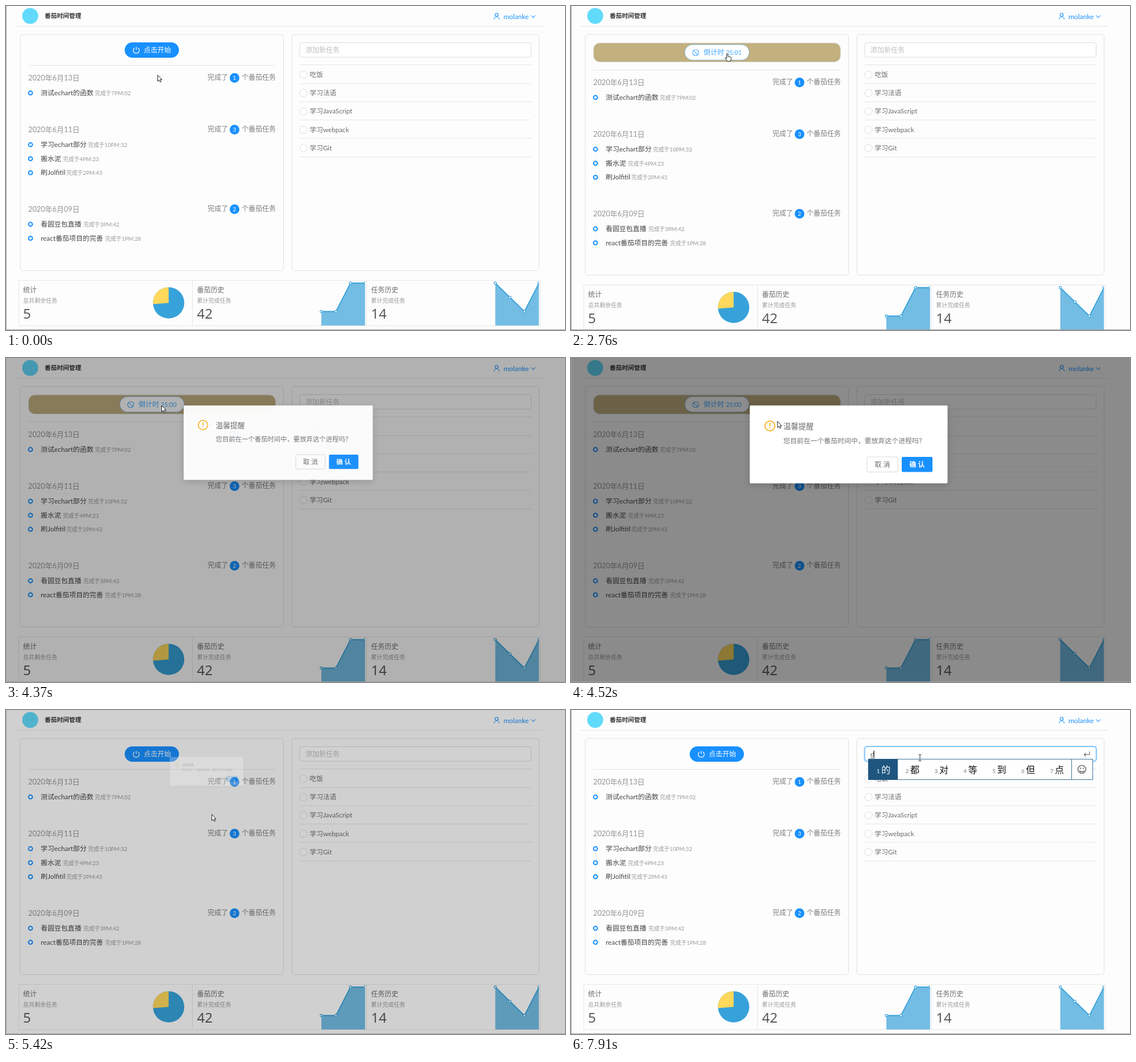
These frames come from a looping animation (982x570 px, 8 s). An HTML page:

```html
<!DOCTYPE html>
<html lang="zh-CN">
<head>
<meta charset="utf-8">
<title>番茄时间管理</title>
<style>
html, body { margin: 0; width: 100%; height: 100%; overflow: hidden; background: #fdfdfd; }
svg { display: block; font-family: Lato, "Noto Sans CJK SC", "Noto Sans CJK", sans-serif; }
</style>
</head>
<body>
<svg id="stage" width="982" height="570" viewBox="0 0 982 570"></svg>
<script>
const LOOP = 8000, BLUE = '#1890ff', HOVER = '#40a9ff', LINE = '#e6e6e6', CHART = '#37a2da';
const stage = document.getElementById('stage');

// The screen only refreshes at these moments and holds in between.
const poses = [0, 120, 250, 390, 520, 660, 790, 930,
  1570, 1700, 1830, 1960, 2090, 2220, 2350, 2760, 3690,
  4250, 4370, 4520, 4650, 4790, 4930, 5060,
  5300, 5420, 5570, 5720, 5870, 6020, 6170, 6320,
  6450, 6600, 6760, 6900, 7050, 7200, 7340, 7490, 7640, 7780, 7910];

const pointerPath = [[0, 266, 121], [930, 273, 83], [4370, 273, 83], [4930, 606, 187], [5060, 608, 188],
  [5300, 453, 188], [5420, 361, 183], [6320, 225, 293], [6450, 300, 267], [6600, 390, 241], [7490, 613, 84]];
const maskKeys = [[4120, 0], [4250, .1], [4370, .3], [4520, .45], [5300, .45], [5420, .18], [5570, .03], [5720, 0]];
const zoomKeys = [[4120, 0], [4250, .4], [4370, .956], [4520, 1], [5300, 1], [5420, .372], [5570, 0]];
const fadeKeys = [[4120, 0], [4250, .4], [4370, .96], [4520, 1], [5300, 1], [5420, .25], [5570, 0]];

// Linear interpolation between [time, ...values] keys.
function at(keys, t) {
  const i = keys.findIndex(k => k[0] > t);
  if (i === 0) return keys[0].slice(1);
  if (i < 0) return keys[keys.length - 1].slice(1);
  const a = keys[i - 1], b = keys[i], u = (t - a[0]) / (b[0] - a[0]);
  return a.slice(1).map((v, n) => v + (b[n + 1] - v) * u);
}

const text = (x, y, s, size = 12, fill = '#6c6c6c', more = '') =>
  `<text x="${x}" y="${y}" font-size="${size}" fill="${fill}" ${more}>${s}</text>`;
const rect = (x, y, w, h, fill = 'none', stroke = 'none', r = 0, more = '') =>
  `<rect x="${x}" y="${y}" width="${w}" height="${h}" rx="${r}" fill="${fill}" stroke="${stroke}" ${more}/>`;
const circle = (x, y, r, fill = 'none', stroke = 'none', w = 1) =>
  `<circle cx="${x}" cy="${y}" r="${r}" fill="${fill}" stroke="${stroke}" stroke-width="${w}"/>`;
const path = (d, stroke = 'none', w = 1, fill = 'none') =>
  `<path d="${d}" stroke="${stroke}" stroke-width="${w}" fill="${fill}"/>`;
const group = (x, y, body) => `<g transform="translate(${x} ${y})">${body}</g>`;
const MIDDLE = 'text-anchor="middle"';

const header = circle(42.5, 17.5, 14, '#61dafb')
  + text(68, 21, '番茄时间管理', 10.7, '#333', 'font-weight="700"')
  + circle(862, 15.5, 2.7, 'none', BLUE, 1.1) + path('M857.5 23.5a4.5 4.8 0 0 1 9 0', BLUE, 1.1)
  + text(874, 23, 'molanke', 12, BLUE) + path('M922.5 16.5l3.7 4 3.7-4', BLUE, 1.1)
  + path('M18 35.5H944', LINE);

const days = [
  [126, '2020年6月13日', [['测试echart的函数', 156, '7PM:02']]],
  [217, '2020年6月11日', [['学习echart部分', 144, '10PM:32'], ['搬水泥', 100, '4PM:23'], ['刷Jolfitil', 106, '2PM:43']]],
  [357, '2020年6月09日', [['看圆豆包直播', 136, '3PM:42'], ['react番茄项目的完善', 174, '1PM:28']]]
];

const history = path('M39 104.5H474', LINE) + days.map(([y, date, items]) =>
  text(39, y + 5, date, 12.8, '#949494')
  + text(354, y + 4, '完成了', 12, '#7c7c7c') + circle(401.5, y + .5, 8.5, BLUE)
  + text(401.5, y + 4, items.length, 10, '#fff', MIDDLE) + text(414, y + 4, '个番茄任务', 12, '#7c7c7c')
  + path(`M43 ${y + 27}v${(items.length - 1) * 24.7}`, '#f2f2f2', 1.5)
  + items.map(([name, x, when], i) => {
    const row = y + 27 + i * 24.7;
    return circle(43, row, 3.4, '#fff', BLUE, 2) + text(61, row + 4, name, 11.9, '#464646')
      + text(x, row + 4, '完成于' + when, 9.7, '#999');
  }).join('')).join('');

const tasks = path('M516 103.5H923', LINE) + ['吃饭', '学习法语', '学习JavaScript', '学习webpack', '学习Git'].map((name, i) => {
  const y = 121 + i * 32.2;
  return circle(522.5, y, 6.5, '#fff', '#dedede') + text(533.5, y + 4, name, 11.7)
    + path(`M516 ${Math.floor(y + 15.3) + .5}H923`, LINE);
}).join('');

function areaChart(x, heights) {
  const pts = heights.map((y, i) => [x + i * 25.6, y]);
  const line = 'M' + pts.join('L');
  return `<svg x="${x - 4}" y="480" width="81" height="82" viewBox="${x - 4} 480 81 82">`
    + path(`${line}V562H${x}Z`, 'none', 0, '#73bde4') + path(line, CHART, 1.8)
    + pts.map(([a, b]) => circle(a, b, 2.1, '#fff', CHART, 1.1)).join('') + '</svg>';
}

function pie(x, y, r, share) {
  const a = share * 2 * Math.PI;
  return circle(x, y, r, CHART)
    + path(`M${x} ${y}L${x - r * Math.sin(a)} ${y - r * Math.cos(a)}A${r} ${r} 0 0 1 ${x} ${y - r}Z`, 'none', 0, '#ffd85c');
}

const stats = rect(22.5, 482.5, 916, 80, 'none', LINE) + path('M327.5 483V562M633.5 483V562', LINE)
  + [['统计', '总共剩余任务', 5], ['番茄历史', '累计完成任务', 42], ['任务历史', '累计完成任务', 14]].map(([a, b, n], i) => {
    const x = 30 + i * 305.6;
    return text(x, 504, a) + text(x, 522, b, 10, '#999')
      + text(x, 550, n, 24, '#595959', 'font-family="Noto Sans, Open Sans, sans-serif"');
  }).join('')
  + pie(285.7, 522.2, 27.5, 5 / 19)
  + areaChart(554, [537.5, 537.5, 487.5, 487.5]) + areaChart(859.5, [487.5, 512.5, 537.5, 487.5]);

function startButton(t) {
  const hovered = t >= 660 && t < 1700;
  const wave = t >= 1570 && t < 1700 ? rect(207, 62, 99, 31, 'none', '#b5dcff', 15.5, 'stroke-width="4"') : '';
  return wave + rect(208.5, 64, 95.3, 27, hovered ? HOVER : BLUE, 'none', 13.5)
    + path('M225.6 73.7a5.3 5.3 0 1 0 6.4 0M228.8 72v5.5', '#fff', 1.2) + text(242, 82, '点击开始', 12, '#fff');
}

function countdown(t) {
  const color = t < 1960 ? '#666' : HOVER;
  const left = t < 2760 ? '25:02' : t < 3690 ? '25:01' : t < 4650 ? '25:00' : '24:59';
  return rect(39.5, 65, 434, 33.5, '#c3b07f', '#dcdcdc', 11)
    + rect(200, 68, 113, 27, '#fff', color, 13.5, 'stroke-dasharray="2 1.5"')
    + circle(219, 82, 5.3, 'none', color, 1.1) + path('M215.3 78.3l7.4 7.4', color, 1.1)
    + text(233, 86, '倒计时', 12, color) + text(272, 86, left, 10.8, color);
}

function taskInput(t) {
  const focused = t >= 7640, typed = t >= 7910;
  const glow = focused ? rect(515, 63.5, 408.5, 27.5, 'none', BLUE, 5, `stroke-width="2" opacity="${t < 7780 ? .1 : .22}"`) : '';
  return glow + rect(516, 64.5, 406.5, 25.5, '#fff', t >= 7340 ? HOVER : '#dcdcdc', 4)
    + (typed ? text(526, 82, 'd', 12, '#555') + path('M526 84.5h6', '#555') : text(526, 82, '添加新任务', 12, '#bfbfbf'))
    + (focused ? path(`M${typed ? 532.5 : 526.5} 71v14`, '#444') + path('M911 73v5.5H901.5M904.5 75.5l-3 3 3 3', '#666', 1.1) : '');
}

function candidates() {
  return rect(522.5, 86.5, 394, 36, '#fff', '#3d7299') + rect(522, 86, 52, 37, '#1f5680')
    + [...'的都对等到但点'].map((c, i) => {
      const x = 537 + i * 50.8;
      return text(x, 110.5, i + 1, 9.5, i ? '#777' : '#fff') + text(x + 8.3, 111, c, 16, i ? '#111' : '#fff');
    }).join('')
    + path('M879.5 87v35', '#3d7299') + circle(897.5, 104.5, 7, 'none', '#333', 1.1)
    + circle(895, 102.5, 1, '#333') + circle(900, 102.5, 1, '#333') + path('M893.5 106.5a4.3 4 0 0 0 8 0', '#333', 1.1);
}

function dialog(t) {
  const [zoom] = at(zoomKeys, t), [fade] = at(fadeKeys, t);
  if (!zoom) return '';
  const confirm = t >= 4930 ? HOVER : BLUE;
  return `<g opacity="${fade}" transform="translate(272 82) scale(${zoom}) translate(-272 -82)">`
    + rect(314, 83.5, 347.5, 137, '#fff', 'none', 2, 'style="filter:drop-shadow(0 3px 6px rgba(0,0,0,.16))"')
    + circle(349.5, 119.5, 8.7, 'none', '#faad14', 1.7) + path('M349.5 114.5v6.2M349.5 122.5v1.7', '#faad14', 1.6)
    + text(373, 125, '温馨提醒', 13.3) + text(373, 150, '您目前在一个番茄时间中，要放弃这个进程吗？', 11.9, '#757575')
    + rect(520, 174, 54, 26.5, '#fff', '#d9d9d9', 2) + text(547, 192, '取 消', 12, '#6c6c6c', MIDDLE)
    + rect(581, 174, 54, 26.5, confirm, 'none', 2) + text(608, 192, '确 认', 12, '#fff', MIDDLE + ' font-weight="700"')
    + '</g>';
}

function pointer(t) {
  const [x, y] = at(pointerPath, t);
  const onButton = t < 4250 && y < 91, onConfirm = t >= 4930 && t < 5300;
  let shape = path('M.5 .5v11l2.6-2.3 1.7 3.7 1.9-.9-1.7-3.5h3Z', '#222', 1, '#fff');
  if (onButton || onConfirm) {
    shape = path('M.4 1.2q1.2-1.4 2.3 0v4.6l4.6 1q1.4.4 1.2 2l-.7 3.3-.9 2.1H1.5L-2 9.3q-.6-1.6 1-1.3l1.4 1.2Z', '#222', 1, '#fff');
  } else if (x > 516 && y > 64 && y < 90) {
    shape = path('M-2.5-5.5h2l.5.5.5-.5h2M0-5v10M-2.5 5.5h2l.5-.5.5.5h2', '#333');
  }
  return group(x, y, shape);
}

function draw(t) {
  const running = t >= 1700 && t < 5300, shift = running ? 8 : 0;
  const [mask] = at(maskKeys, t);
  stage.innerHTML = rect(0, 0, 982, 570, '#fdfdfd') + header
    + rect(25, 50, 462.5, 415.5 + shift, 'none', '#e0e0e0', 5) + rect(502, 50, 434.5, 415.5 + shift, 'none', '#e0e0e0', 5)
    + (running ? countdown(t) : startButton(t)) + group(0, shift, history + stats)
    + taskInput(t) + tasks + (t >= 7910 ? candidates() : '')
    + rect(1, 0, 981, 569, '#000', 'none', 0, `opacity="${mask}"`) + dialog(t)
    + path('M.5 0V570M0 569.5H982', '#a0a0a0') + pointer(t);
}

let shown = -1;
function tick() {
  const now = performance.now() % LOOP;
  const pose = poses.filter(p => p <= now).pop();
  if (pose !== shown) draw(shown = pose);
  requestAnimationFrame(tick);
}
tick();
</script>
</body>
</html>
```
